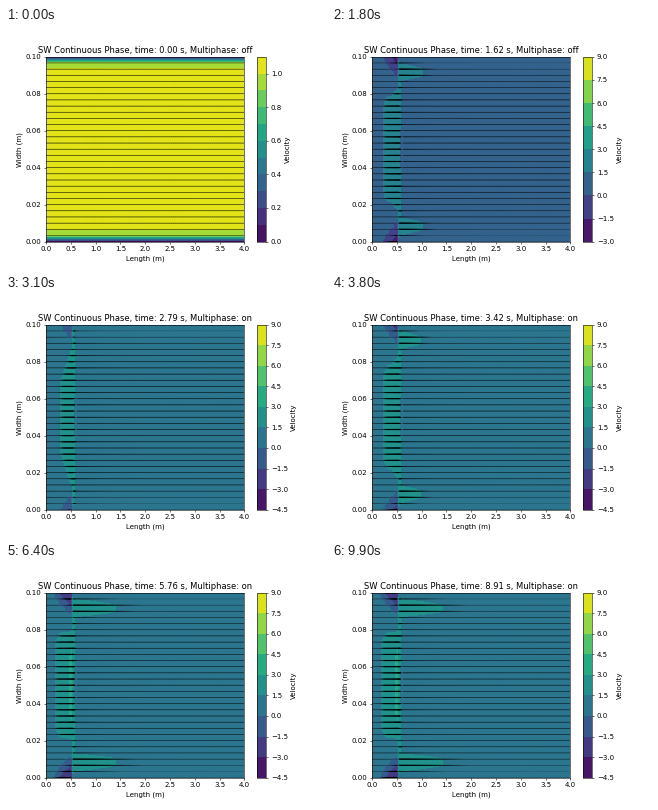
A matplotlib script that plays this animation: 320 px wide and 240 px high, repeating every 10000 ms.

```python
import numpy as np
import matplotlib.pyplot as plt
from matplotlib.animation import FuncAnimation
from matplotlib.ticker import MaxNLocator

FRAMES, DT = 100, 0.09
START, SWITCH = 1.0, 2.0
NX, NY = 301, 31

x = np.linspace(0, 4, NX)
y = np.linspace(0, 0.1, NY)
X, Y = np.meshgrid(x, y)
C = np.abs(Y - 0.05)            # distance from the centre line
D = 0.05 - C                    # distance from the nearest wall
ODD = np.where(np.arange(NY) % 2, 1.0, -1.0)[:, None]
UPSTREAM = X < 0.53


def step(v, width):
    return 0.5 * (1 + np.tanh(v / (2 * width)))


def channel(t):
    """Boundary layer growing along a plain channel."""
    grow = min(t / 0.9, 1)
    inlet = np.interp(D, [0, 0.0033, 0.0066], [0, 0.9, 1.02])
    grown = np.interp(D, [0, 0.0033, 0.0081, 0.014], [0, 0.5, 0.9, 1.02])
    u = inlet + grow * (1 - np.exp(-X / 0.6)) * (grown - inlet)
    edge = D + 0.0037 * np.exp(-((X - 0.7) / 0.35) ** 2)
    return u + 0.06 * grow * step(X - 0.6, 0.02) * step(edge - 0.02, 0.001)


def plume(t):
    """Channel flow disturbed by the injector near x = 0.55."""
    on = t >= SWITCH
    age, tau = (t - SWITCH, 1.34) if on else (t - START, 0.55)
    g = 1 - np.exp(-(age / tau) ** 1.6)
    late = max(0, g - 0.35) / 0.65
    u = np.maximum(channel(t), 0.05)
    u += np.where(UPSTREAM, 0, np.exp(-(X - 0.55) / 0.5) * (0.2 + 0.1 * ODD))

    # Fast block in front of the injector, with a faster core
    half = min(0.026, 0.012 + 0.02 * g)
    front = 0.35 - 0.16 * g + 100 * g ** 2 * np.maximum(0, C - half)
    core = 1.4 * late * np.exp(-((X - 0.5) / 0.06) ** 2 - (C / 0.022) ** 4)
    u += np.where(UPSTREAM, step(X - front, 0.02) + core, 0)

    # Ripple on the injector column and slow spot behind it
    u += (0.65 + 0.25 * ODD) * np.exp(-((X - 0.55) / 0.03) ** 2)
    u -= 2.2 * np.exp(-((X - 0.585) / 0.02) ** 2 - (C / 0.009) ** 4)

    # Jets along the walls
    if late > 0:
        r = np.maximum(X - 0.53, 0) / (0.02 + 0.95 * late)
        jet = 1.5 + 0.8 * (1 - r ** 1.5 - ((D - 0.0083) / 0.0047) ** 2)
        u = np.where(UPSTREAM, u, np.maximum(u, jet))

    # Backflow in the corners
    back = 0.34 - 0.2 * g
    q = np.clip((X - back) / (0.52 - back), 0, 1) ** (0.8 - 0.18 * g)
    z = q - D / (0.0085 + 0.0052 * g)
    u = np.where(UPSTREAM & (z > 0), -3.3 * g * z, u)

    rise = min(1, g / 0.3)
    return u, (-4 if on else -2.9) * rise, 2 + 6.3 * rise


def flow(t):
    if t < START:
        return channel(t), 0, 1.03 + 0.13 * min(t / 0.9, 1)
    return plume(t)


fig = plt.figure(figsize=(6.4, 4.8), dpi=50)


def draw(i):
    t = i * DT
    u, lo, hi = flow(t)
    levels = MaxNLocator(11, min_n_ticks=1).tick_values(lo, hi)
    u = np.clip(u, levels[0], levels[-1])
    fig.clear()
    ax = fig.add_subplot()
    filled = ax.contourf(X, Y, u, levels)
    fig.colorbar(filled, ax=ax, label="Velocity")
    ax.quiver(X, Y, u, np.zeros_like(u))
    ax.set(xlim=(0, 4), ylim=(0, 0.1), xlabel="Length (m)", ylabel="Width (m)")
    mode = "on" if t >= SWITCH else "off"
    ax.set_title(f"SW Continuous Phase, time: {t:.2f} s, Multiphase: {mode}")
    return []


anim = FuncAnimation(fig, draw, frames=FRAMES, init_func=lambda: [],
                     interval=100, repeat=True, repeat_delay=0)
plt.show()
```
